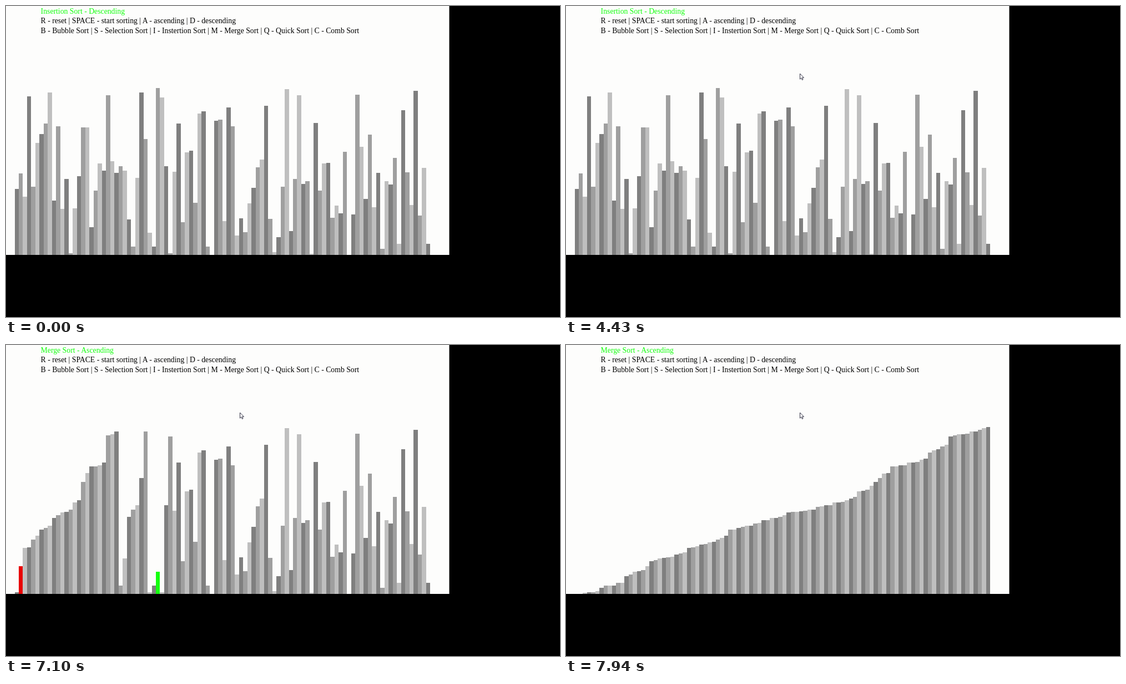
Animation of 998x561 px, one loop 8 s. Source, as an HTML page:

```html
<!DOCTYPE html>
<html lang="en">
<head>
<meta charset="utf-8">
<title>Sorting visualizer</title>
<style>
  html, body { margin: 0; width: 100%; height: 100%; overflow: hidden; background: #000; }
  svg { display: block; width: 998px; height: 561px; }
  text { font: 13.74px "Liberation Serif", "Times New Roman", serif; white-space: pre; }
  #bars rect { shape-rendering: crispEdges; }
</style>
</head>
<body>
<svg viewBox="0 0 998 561">
  <rect width="998" height="561" fill="#000"/>
  <rect width="798.5" height="449" fill="#fdfdfc"/>
  <text id="title" x="62.6" y="14" fill="#14ff0f"></text>
  <text x="62.6" y="31">R - reset | SPACE - start sorting | A - ascending | D - descending</text>
  <text x="62.6" y="49">B - Bubble Sort | S - Selection Sort | I - Instertion Sort | M - Merge Sort | Q - Quick Sort | C - Comb Sort</text>
  <g id="bars"></g>
  <path id="cursor" d="M.5 0v10l2.3-2.1 1.6 3.5 1.6-.7-1.6-3.4h3.1z" fill="#fff" stroke="#1c1c30" stroke-width=".9"/>
</svg>
<script>
const LOOP = 8000, FLOOR = 449, LEFT = 15.5, PITCH = 7.485;
const GREYS = ['#7f7f7f', '#9f9f9f', '#bfbfbf'], RED = '#e80000', GREEN = '#14ff0f';

// Top edge of each unsorted bar
const TOPS = [
  330, 302, 344, 163, 326, 247, 231, 212, 156, 351, 217, 366, 312, 446, 365, 307, 219, 219, 399, 333,
  284, 297, 161, 280, 301, 289, 297, 385, 434, 310, 156, 240, 409, 434, 148, 165, 289, 446, 299, 212,
  390, 264, 261, 355, 194, 190, 434, 449, 207, 205, 388, 183, 217, 414, 383, 408, 356, 328, 291, 277,
  180, 384, 444, 417, 326, 150, 406, 312, 161, 321, 316, 447, 211, 333, 284, 283, 382, 360, 374, 263,
  449, 376, 160, 254, 348, 232, 363, 301, 438, 316, 322, 274, 429, 188, 300, 359, 153, 378, 292, 429
];

const TITLES = [
  [0, 'Insertion Sort - Descending'],
  [5140, 'Merge Sort - Descending'],
  [6300, 'Merge Sort - Ascending']
];

const SORT = { time: 7100, writes: 151, tick: 34, perTick: 24.3 };
const MOVE = { start: 2530, length: 545, from: [966, 320], to: [421, 122] };

const $ = id => document.getElementById(id);
const title = $('title'), cursor = $('cursor');

const bars = TOPS.map((_, i) => {
  const bar = document.createElementNS('http://www.w3.org/2000/svg', 'rect');
  bar.setAttribute('x', LEFT + PITCH * i);
  bar.setAttribute('width', PITCH);
  return $('bars').appendChild(bar);
});

// Every write of the merge sort: target slot, value, index in the half it came from
function mergeWrites(source) {
  const a = [...source], writes = [];
  (function sort(lo, hi) {
    if (lo >= hi) return;
    const mid = (lo + hi) >> 1;
    sort(lo, mid);
    sort(mid + 1, hi);
    const l = a.slice(lo, mid + 1), r = a.slice(mid + 1, hi + 1);
    for (let k = lo, i = 0, j = 0; k <= hi; k++) {
      const fromLeft = j >= r.length || (i < l.length && l[i] >= r[j]);
      const index = fromLeft ? i++ : j++;
      a[k] = (fromLeft ? l : r)[index];
      writes.push({ slot: k, top: a[k], index });
    }
  })(0, a.length - 1);
  return writes;
}
const writes = mergeWrites(TOPS);

let shown = -1;
function drawBars(t) {
  const ticks = Math.floor((t - SORT.time) / SORT.tick);
  const wanted = Math.round(SORT.writes + ticks * SORT.perTick);
  const count = Math.max(0, Math.min(writes.length, wanted));
  if (count === shown) return;
  shown = count;
  const tops = [...TOPS];
  for (const w of writes.slice(0, count)) tops[w.slot] = w.top;
  const active = count && count < writes.length ? writes[count - 1] : {};
  bars.forEach((bar, i) => {
    bar.setAttribute('y', tops[i]);
    bar.setAttribute('height', FLOOR - tops[i]);
    bar.setAttribute('fill', i === active.slot ? GREEN : i === active.index ? RED : GREYS[i % 3]);
  });
}

function drawCursor(t) {
  const p = Math.max(0, Math.min(1, (t - MOVE.start) / MOVE.length));
  const eased = 1 - (1 - p) ** 2;
  const [x, y] = MOVE.from.map((v, i) => v + (MOVE.to[i] - v) * eased);
  cursor.setAttribute('transform', `translate(${x} ${y})`);
  cursor.setAttribute('visibility', t < MOVE.start ? 'hidden' : 'visible');
}

function draw(t) {
  const text = TITLES.filter(([from]) => from <= t).pop()[1];
  if (title.textContent !== text) title.textContent = text;
  drawBars(t);
  drawCursor(t);
}

const begin = performance.now();
function frame() {
  draw((performance.now() - begin) % LOOP);
  requestAnimationFrame(frame);
}
frame();
</script>
</body>
</html>
```
